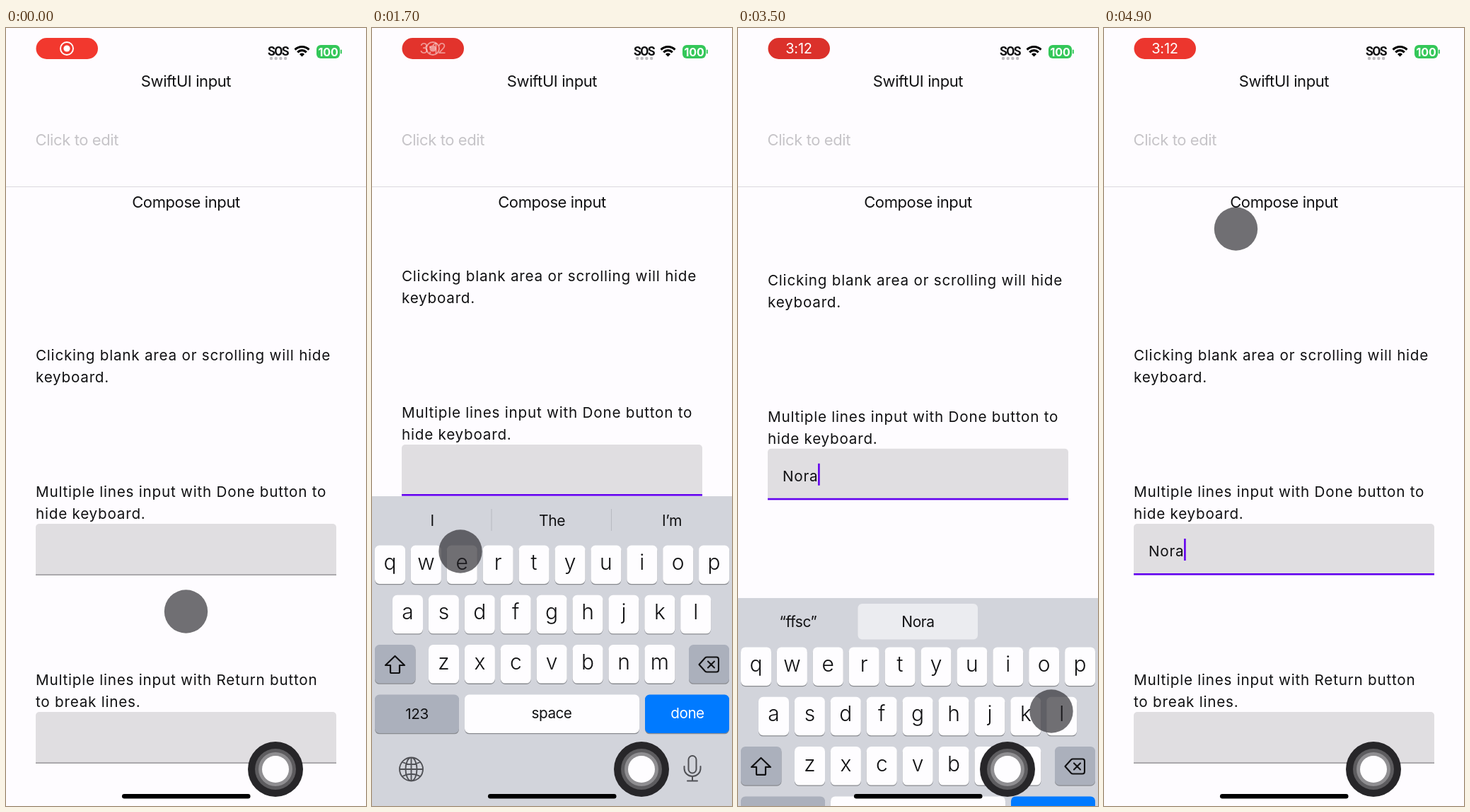
An HTML page with a canvas for the animation above (5 s loop, 509x1100 px).

```html
<!DOCTYPE html>
<html lang="en">
<head>
<meta charset="utf-8">
<title>Keyboard input demo</title>
<style>
html, body { margin: 0; height: 100%; overflow: hidden; background: #fefcff; }
canvas { display: block; }
</style>
</head>
<body>
<canvas id="stage" width="509" height="1100"></canvas>
<script>
const ctx = document.getElementById('stage').getContext('2d');
const INK = '#111113', PURPLE = '#6200ee', WHITE = '#fefdff';
const LOOP = 5000, STEP = 100;
const KEYBOARD = 438, SPRING = 18.26, FIELD_GAP = 326;
const BODY = { size: 20.7, spacing: 0.75 };

// Pointer stops: step, x, y
const POINTER = [
  [0, 254.5, 825], [5, 125, 740], [17, 125, 740], [20, 196, 820], [21, 196, 820],
  [23, 135, 795], [24, 125, 808], [27, 204, 885], [28, 204, 885],
  [33, 443, 966], [48, 443, 966], [49, 186.5, 284],
];
// Typed text: step, value
const TYPED = [[0, ''], [20, 'f'], [21, 'ff'], [23, 'ffs'], [27, 'ffsc'], [35, 'Nora']];
const CURSOR_RESETS = [8, 20, 21, 23, 27, 35];
const SUGGESTIONS = [
  [0, ['I', 'The', 'I’m']], [21, ['“f”', 'F', 'for']],
  [25, ['“ffs”', 'FFS', '']], [29, ['“ffsc”', 'Nora', '']],
];
const PRESSES = [[20, 'f'], [22, ''], [23, 's'], [25, ''], [27, 'c'], [29, '']];
const ROWS = [['qwertyuiop', 4], ['asdfghjkl', 29], ['zxcvbnm', 80]];

const latest = (list, n) => list.filter(e => e[0] <= n).pop()?.[1];
const clamp = v => Math.min(1, Math.max(0, v));

function text(str, x, y, { size = 22, spacing = -0.4, weight = 400, color = INK, align = 'left', family = 'Inter' } = {}) {
  ctx.font = `${weight} ${size}px ${family}, sans-serif`;
  ctx.letterSpacing = spacing + 'px';
  ctx.fillStyle = color;
  const width = ctx.measureText(str).width;
  ctx.fillText(str, align === 'center' ? x - width / 2 : x, y);
  return width;
}

function box(x, y, w, h, r, color) {
  ctx.fillStyle = color;
  ctx.beginPath();
  ctx.roundRect(x, y, w, h, r);
  ctx.fill();
}

function disc(x, y, r, color) {
  ctx.fillStyle = color;
  ctx.beginPath();
  ctx.arc(x, y, r, 0, 7);
  ctx.fill();
}

function line(path, x, y, width, color) {
  ctx.save();
  ctx.translate(x, y);
  ctx.lineWidth = width;
  ctx.strokeStyle = color;
  ctx.lineJoin = ctx.lineCap = 'round';
  ctx.stroke(new Path2D(path));
  ctx.restore();
}

// Critically damped spring from 0 to 1
function spring(t) {
  const w = SPRING * Math.max(0, t);
  return 1 - (1 + w) * Math.exp(-w);
}
const keyboardHeight = (t, lag) => KEYBOARD * (spring(t - 0.69 - lag) - spring(t - 3.4356 - lag));

function statusBar(t) {
  const glow = 0.5 + 0.5 * Math.cos((t - 2.4) * Math.PI);
  const mix = (a, b) => Math.round(a + (b - a) * glow);
  box(42.5, 14, 87.5, 30, 15, `rgb(${mix(218, 255)},${mix(49, 59)},${mix(43, 48)})`);

  const clock = clamp((t - 1.5) / 0.4);
  ctx.globalAlpha = 1 - clock;
  line('M9 0A9 9 0 1 1-9 0A9 9 0 1 1 9 0', 86, 29, 1.9, '#fff');
  disc(86, 29, 4.6, '#fff');
  ctx.globalAlpha = clock;
  text('3:12', 86, 36, { size: 20, spacing: -0.2, color: '#fff', align: 'center' });
  ctx.globalAlpha = 1;

  text('SOS', 384.5, 38.5, { size: 17.5, spacing: -1.6, weight: 700, align: 'center', family: 'Roboto' });
  for (let i = 0; i < 4; i++) disc(375 + i * 6.7, 43, 2.2, '#bdbbbf');

  ctx.strokeStyle = '#000';
  ctx.lineCap = 'butt';
  for (const [r, w] of [[14, 3.2], [8.8, 3.2], [2.5, 5]]) {
    ctx.lineWidth = w;
    ctx.beginPath();
    ctx.arc(418.5, 40.5, r, -Math.PI * 0.75, -Math.PI * 0.25);
    ctx.stroke();
  }
  box(439, 24, 33, 19, 6, '#34c759');
  box(472.8, 30.5, 2, 6, 1, '#34c759');
  text('100', 455.5, 39.5, { size: 16, spacing: -0.1, weight: 700, color: '#fff', align: 'center' });
}

function field(y, focused) {
  box(42, y, 425, 72, [5, 5, 0, 0], '#e0dee1');
  ctx.fillStyle = focused ? PURPLE : '#89878b';
  ctx.fillRect(42, y + (focused ? 70 : 71.5), 425, focused ? 2.6 : 1.3);
}

function content(n, scroll) {
  text('SwiftUI input', 254.5, 83, { align: 'center' });
  text('Click to edit', 41.5, 166, { color: '#c6c4c8' });
  ctx.fillStyle = '#dcdade';
  ctx.fillRect(0, 224, 509, 1);
  text('Compose input', 254.5, 254, { align: 'center' });

  ctx.save();
  ctx.translate(0, -scroll);
  [
    ['Clicking blank area or scrolling will hide', 470], ['keyboard.', 501],
    ['Multiple lines input with Done button to', 663], ['hide keyboard.', 694],
    ['Multiple lines input with Return button', 929], ['to break lines.', 960],
  ].forEach(([str, y]) => text(str, 42, y, BODY));
  field(701, n >= 7);
  field(967, false);
  const width = text(latest(TYPED, n), 63, 747, BODY);
  const reset = CURSOR_RESETS.filter(r => r <= n).pop() ?? 8;
  if (n >= 7 && (n - reset) % 10 < 5) {
    ctx.fillStyle = PURPLE;
    ctx.fillRect(62.7 + width, 722, 2.6, 31);
  }
  ctx.restore();
}

function key(x, y, w, color = WHITE) {
  box(x, y + 1.3, w, 54.5, 6.5, '#898b90');
  box(x, y, w, 54.5, 6.5, color);
}

function popup(letter, x, y) {
  ctx.save();
  ctx.translate(x, y);
  ctx.shadowColor = 'rgba(0,0,0,.3)';
  ctx.shadowBlur = 3;
  ctx.shadowOffsetY = 1;
  ctx.fillStyle = WHITE;
  ctx.fill(new Path2D('M-8-85H51Q60-85 60-76V-36C60-18 43-18 43 0V48Q43 55 36.5 55H6.5Q0 55 0 48V0C0-18-17-18-17-36V-76Q-17-85-8-85Z'));
  ctx.restore();
  text(letter, x + 21.5, y - 30, { size: 45, spacing: 0, weight: 300, align: 'center' });
}

function keyboard(n, top) {
  ctx.save();
  ctx.translate(0, top);
  ctx.fillStyle = '#d2d4db';
  ctx.fillRect(0, 0, 509, KEYBOARD + 2);

  const words = latest(SUGGESTIONS, n);
  if (n >= 21) {
    box(169.5, 8, 169.5, 50.5, 6, '#ebecf0');
  } else {
    ctx.fillStyle = '#b8bac1';
    ctx.fillRect(168.5, 18, 1, 31);
    ctx.fillRect(338, 18, 1, 31);
  }
  words.forEach((word, i) => text(word, 85 + i * 169.5, 41.5, { size: 21, align: 'center' }));

  const pressed = latest(PRESSES, n);
  let bubble;
  ROWS.forEach(([letters, left], row) => {
    const y = 69.5 + row * 70.3;
    [...letters].forEach((letter, i) => {
      const x = left + i * 50.9;
      key(x, y, 43);
      if (letter === pressed) bubble = [letter, x, y];
      text(letter, x + 21.5, y + 34.5, { size: 30, spacing: 0, weight: 300, align: 'center' });
    });
  });

  const grey = '#abb0bc', label = { size: 20.7, spacing: -0.5, align: 'center' };
  key(4, 210, 57.5, grey);
  key(448, 210, 57, grey);
  key(4, 280.5, 119, grey);
  key(131, 280.5, 247);
  key(386, 280.5, 119, '#007aff');
  text('123', 63.5, 315, label);
  text('space', 254, 313.5, label);
  text('done', 446, 313.5, { ...label, color: '#fff' });

  line('M0-12L13.5 1H6.5V10.5Q6.5 12 5 12H-5Q-6.5 12-6.5 10.5V1H-13.5Z', 32.5, 238, 2.2, INK);
  line('M-14 0L-5.5-9.5Q-4.5-10.5-3-10.5H10.5Q13.5-10.5 13.5-7.5V7.5Q13.5 10.5 10.5 10.5H-3Q-4.5 10.5-5.5 9.5ZM-1.5-4.5L7.5 4.5M7.5-4.5L-1.5 4.5', 476.5, 238, 2.1, INK);
  line('M16.5 0A16.5 16.5 0 1 1-16.5 0A16.5 16.5 0 1 1 16.5 0M8 0A8 16.5 0 1 1-8 0A8 16.5 0 1 1 8 0M0-16.5V16.5M-16.5 0H16.5M-12.5-10Q0-3.5 12.5-10M-12.5 10Q0 3.5 12.5 10', 55.5, 386, 1.9, '#505156');
  line('M-5.5-12.5A5.5 5.5 0 0 1 5.5-12.5V1A5.5 5.5 0 0 1-5.5 1ZM-11.5-3V0A11.5 11 0 0 0 11.5 0V-3M0 11V17.5M-7 17.5H7', 453, 385, 2, '#505156');

  if (bubble) popup(...bubble);
  ctx.restore();
}

function pointer(n) {
  const i = POINTER.findLastIndex(p => p[0] <= n);
  const [start, x, y] = POINTER[i];
  const [end, toX, toY] = POINTER[i + 1] ?? [start + 1, x, y];
  const f = (n - start) / (end - start), ease = f * f * (3 - 2 * f);
  disc(x + (toX - x) * ease, y + (toY - y) * ease, 30.7, 'rgba(34,32,36,.64)');
}

function draw(n) {
  const t = n * STEP / 1000;
  ctx.fillStyle = '#fefcff';
  ctx.fillRect(0, 0, 509, 1100);

  const lagged = keyboardHeight(t, t < 2 ? 0.035 : 0.055);
  content(n, Math.max(0, lagged - FIELD_GAP));
  statusBar(t);
  const height = keyboardHeight(t, 0);
  if (height > 0.5) keyboard(n, 1100 - height);

  disc(381, 1048, 39, '#272629');
  disc(381, 1048, 29, '#5d5c5f');
  disc(381, 1048, 24, '#8f8e91');
  disc(381, 1048, 19, WHITE);
  box(164, 1083, 181.5, 6.5, 3.2, '#000');
  pointer(n);
}

function tick() {
  draw(Math.floor(performance.now() % LOOP / STEP));
  requestAnimationFrame(tick);
}
tick();
</script>
</body>
</html>
```
